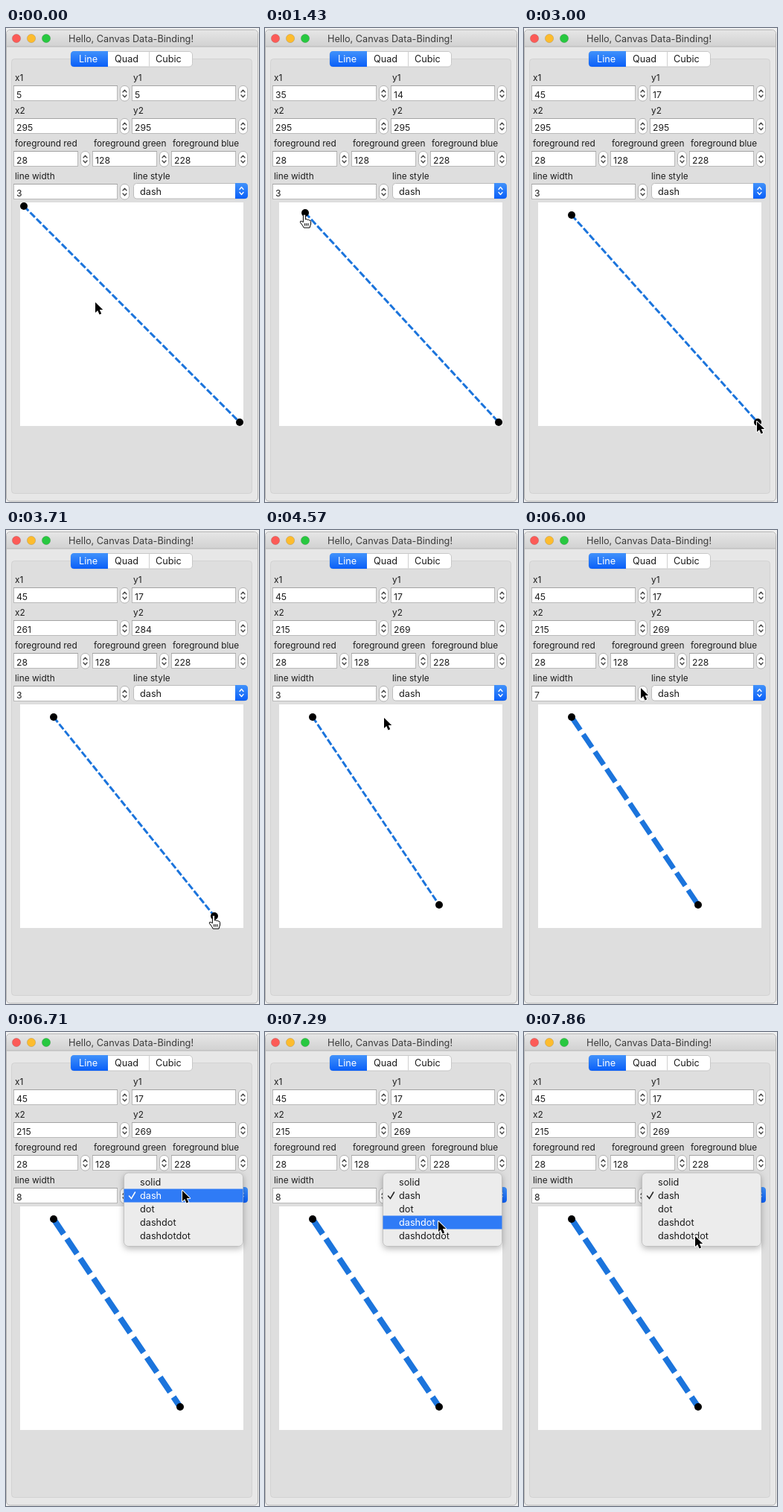
Animation of 340 by 636 pixels, one loop 8000 ms. Source, as an HTML page:

```html
<!DOCTYPE html>
<html lang="en">
<head>
<meta charset="utf-8">
<title>Canvas Data-Binding</title>
<style>
  html, body { margin: 0; width: 100%; height: 100%; overflow: hidden; background: #f0f0f0; }
  svg { display: block; width: 340px; height: 636px; }
  text { font-family: Inter, "Open Sans", sans-serif; font-size: 12.7px; fill: #1c1c1c; white-space: pre; }
  .label { font-size: 11.8px; }
  .value { font-size: 12.2px; }
  .light { fill: #fff; }
  .chevron { fill: none; stroke: #444; stroke-width: 1.3; stroke-linecap: round; stroke-linejoin: round; }
</style>
</head>
<body>
<svg id="stage" viewBox="0 0 340 636" xmlns="http://www.w3.org/2000/svg">
  <defs>
    <linearGradient id="bar" x2="0" y2="1"><stop stop-color="#e6e6e6"/><stop offset="1" stop-color="#d1d1d1"/></linearGradient>
    <linearGradient id="blue" x2="0" y2="1"><stop stop-color="#4192fb"/><stop offset="1" stop-color="#0a5ff8"/></linearGradient>
    <filter id="shadow" x="-20%" y="-20%" width="140%" height="150%">
      <feDropShadow dx="0" dy="3" stdDeviation="4" flood-opacity=".28"/>
    </filter>
  </defs>
</svg>
<script>
const stage = document.getElementById('stage');
const LOOP = 8000, TICK = 1000 / 7;
const STYLES = ['solid', 'dash', 'dot', 'dashdot', 'dashdotdot'];
const CANVAS = { x: 19, y: 234 };

function add(parent, tag, attrs, content = '') {
  const el = document.createElementNS(stage.namespaceURI, tag);
  set(el, attrs);
  el.textContent = content;
  return parent.appendChild(el);
}
function set(el, attrs) {
  for (const name in attrs) el.setAttribute(name, attrs[name]);
}
const rect = (parent, x, y, width, height, fill, more) =>
  add(parent, 'rect', { x, y, width, height, fill, ...more });
const path = (parent, d, more) => add(parent, 'path', { d, ...more });
const text = (parent, x, y, content, cls = '') =>
  add(parent, 'text', { x, y, class: cls }, content);
const chevrons = (x, y, reach, more) =>
  path(stage, `M${x - 2.5} ${y - 2}l2.5 -${reach}l2.5 ${reach}M${x - 2.5} ${y + 2}l2.5 ${reach}l2.5 -${reach}`,
    { class: 'chevron', ...more });

function spinner(x, top, width, label, value, labelX = x + 2) {
  text(stage, labelX, top - 6, label, 'label');
  rect(stage, x + .5, top + .5, width - 1, 20, '#fff', { stroke: '#b9b9b9' });
  rect(stage, x, top, width, 1, '#a3a3a3');
  rect(stage, x + width + 3.5, top + .5, 12, 20.5, '#fff', { rx: 5.5, stroke: '#b4b4b4' });
  chevrons(x + width + 9.5, top + 11, 2.8);
  return text(stage, x + 4, top + 17, value, 'value');
}

// Window frame
rect(stage, .5, 2.5, 338, 632.5, '#e7e7e7', { rx: 5, stroke: '#b5b5b5' });
path(stage, 'M1 25V8q0 -5 5 -5h327q5 0 5 5v17z', { fill: 'url(#bar)' });
rect(stage, 1, 24.5, 337, 1, '#b6b6b6');
['#fc5b57', '#fdbc2e', '#28c840'].forEach((fill, i) =>
  add(stage, 'circle', { cx: 14 + 20 * i, cy: 14, r: 5.7, fill, stroke: '#000', 'stroke-opacity': .15, 'stroke-width': .8 }));
text(stage, 84, 19, 'Hello, Canvas Data-Binding!').style.fill = '#3c3c3c';

// Tabs
rect(stage, 7.5, 41.5, 323, 583, '#dedede', { rx: 4, stroke: '#d2d2d2' });
rect(stage, 87, 31.5, 163.5, 20.5, '#fff', { rx: 4.5, stroke: '#c2c2c2', 'stroke-width': .9 });
path(stage, 'M137 31V52H91.5q-4.5 0 -4.5 -4.5v-12q0 -4.5 4.5 -4.5z', { fill: 'url(#blue)' });
rect(stage, 192, 31.5, 1, 20, '#d0d0d0');
text(stage, 98, 46, 'Line', 'light');
text(stage, 146, 46, 'Quad');
text(stage, 201, 46, 'Cubic');

// Form
const fields = {
  x1: spinner(10, 77, 140, 'x1', 5),
  y1: spinner(169, 77, 140, 'y1', 5),
  x2: spinner(10, 121, 140, 'x2', 295),
  y2: spinner(169, 121, 140, 'y2', 295),
  width: spinner(10, 209, 140, 'line width', 3)
};
spinner(10, 165, 87, 'foreground red', 28);
spinner(116, 165, 87, 'foreground green', 128);
spinner(222, 165, 87, 'foreground blue', 228, 224);
text(stage, 171, 203, 'line style', 'label');
rect(stage, 171.5, 208.5, 153, 20.5, '#fff', { rx: 4, stroke: '#bcbcbc' });
path(stage, 'M308 208h12.5q4.5 0 4.5 4.5v12q0 4.5 -4.5 4.5h-12.5z', { fill: 'url(#blue)' });
chevrons(316.5, 218.5, 3, { style: 'stroke:#fff' });
text(stage, 180, 224, 'dash');

// Drawing
rect(stage, CANVAS.x, CANVAS.y, 300, 300, '#fff');
const drawing = add(stage, 'g', { transform: `translate(${CANVAS.x} ${CANVAS.y})` });
const line = add(drawing, 'line', { stroke: '#1b74dc' });
const dots = [0, 1].map(() => add(drawing, 'circle', { r: 5 }));

// Drop-down
const menu = add(stage, 'g', {});
rect(menu, 158.5, 189, 160, 98.5, '#ececec', { rx: 6, stroke: '#b8b8b8', 'stroke-width': .8, filter: 'url(#shadow)' });
const highlight = rect(menu, 158.5, 0, 160, 18, '#2f7bf6');
const items = STYLES.map((name, i) => text(menu, 180, 206 + 18 * i, name));
const check = path(menu, 'M165.5 220l3 3.5l5 -8.5', { fill: 'none', 'stroke-width': 1.5, 'stroke-linecap': 'round' });

// Pointers, both with the tip at 0,0
const arrow = path(stage, 'M0 0V14l3.2 -3l2.4 5.4l2.6 -1.1l-2.4 -5.2h4.4z',
  { stroke: '#fff', 'stroke-width': 2, 'paint-order': 'stroke', 'stroke-linejoin': 'round' });
const hand = path(stage, 'M-1.6 10.5V1.6a1.6 1.6 0 0 1 3.2 0V7a1.5 1.5 0 0 1 2.6 .6a1.5 1.5 0 0 1 2.6 .7' +
  'a1.4 1.4 0 0 1 1.8 1.2V13L7 18H-.8L-2.5 15L-5.6 10.8Q-6 8.4 -3.8 9.2zM.6 12v3.5M2.8 12v3.5M5 12v3.5',
  { fill: '#fff', stroke: '#000', 'stroke-linejoin': 'round' });

// Tracks: [tick, ...values]
const pointer = [[0, 120, 368], [5, 23, 241], [8, 23, 241], [10, 53, 250], [11, 63, 253], [12, 66, 258],
  [14, 240, 410], [15, 240, 410], [18, 326, 505], [21, 313, 528], [22, 313, 528], [29, 233, 502],
  [30, 222, 440], [32, 160, 252], [36, 157, 212], [43, 157, 212], [45, 236, 213], [47, 238, 213], [53, 230, 274]];
const start = [[8, 5, 5], [10, 35, 14], [11, 45, 17]];
const end = [[22, 295, 295], [29, 215, 269]];
const clicks = [38, 39, 41, 42, 43];
const grabs = [[7, 12], [23, 29]];

function sample(track, tick) {
  const next = track.findIndex(key => key[0] > tick);
  if (next < 1) return (next ? track[track.length - 1] : track[0]).slice(1);
  const [a, b] = [track[next - 1], track[next]];
  const part = (tick - a[0]) / (b[0] - a[0]);
  return a.slice(1).map((v, i) => Math.round(v + (b[i + 1] - v) * part));
}
const show = (el, on) => { el.style.display = on ? '' : 'none'; };

function render(time) {
  const tick = Math.min(55, Math.floor((time % LOOP + 3) / TICK));
  const [x1, y1] = sample(start, tick), [x2, y2] = sample(end, tick);
  const [px, py] = sample(pointer, tick);
  const width = 3 + clicks.filter(at => at <= tick).length;

  const values = { x1, y1, x2, y2, width };
  for (const name in fields) fields[name].textContent = values[name];
  set(line, { x1, y1, x2, y2, 'stroke-width': width, 'stroke-dasharray': `${width * 3} ${width}` });
  set(dots[0], { cx: x1, cy: y1 });
  set(dots[1], { cx: x2, cy: y2 });

  const row = tick < 55 ? Math.floor((py - 210) / 18) + 1 : -1;
  show(menu, tick >= 46);
  show(highlight, row >= 0);
  set(highlight, { y: 192.5 + 18 * row });
  items.forEach((item, i) => set(item, { class: i === row ? 'light' : '' }));
  set(check, { stroke: row === 1 ? '#fff' : '#222' });

  const grabbing = grabs.some(([from, to]) => tick >= from && tick <= to);
  show(hand, grabbing);
  show(arrow, !grabbing);
  set(grabbing ? hand : arrow, { transform: `translate(${px} ${py})` });
}

const begin = performance.now();
function frame(now) {
  render(Math.max(0, now - begin));
  requestAnimationFrame(frame);
}
render(0);
requestAnimationFrame(frame);
</script>
</body>
</html>
```
